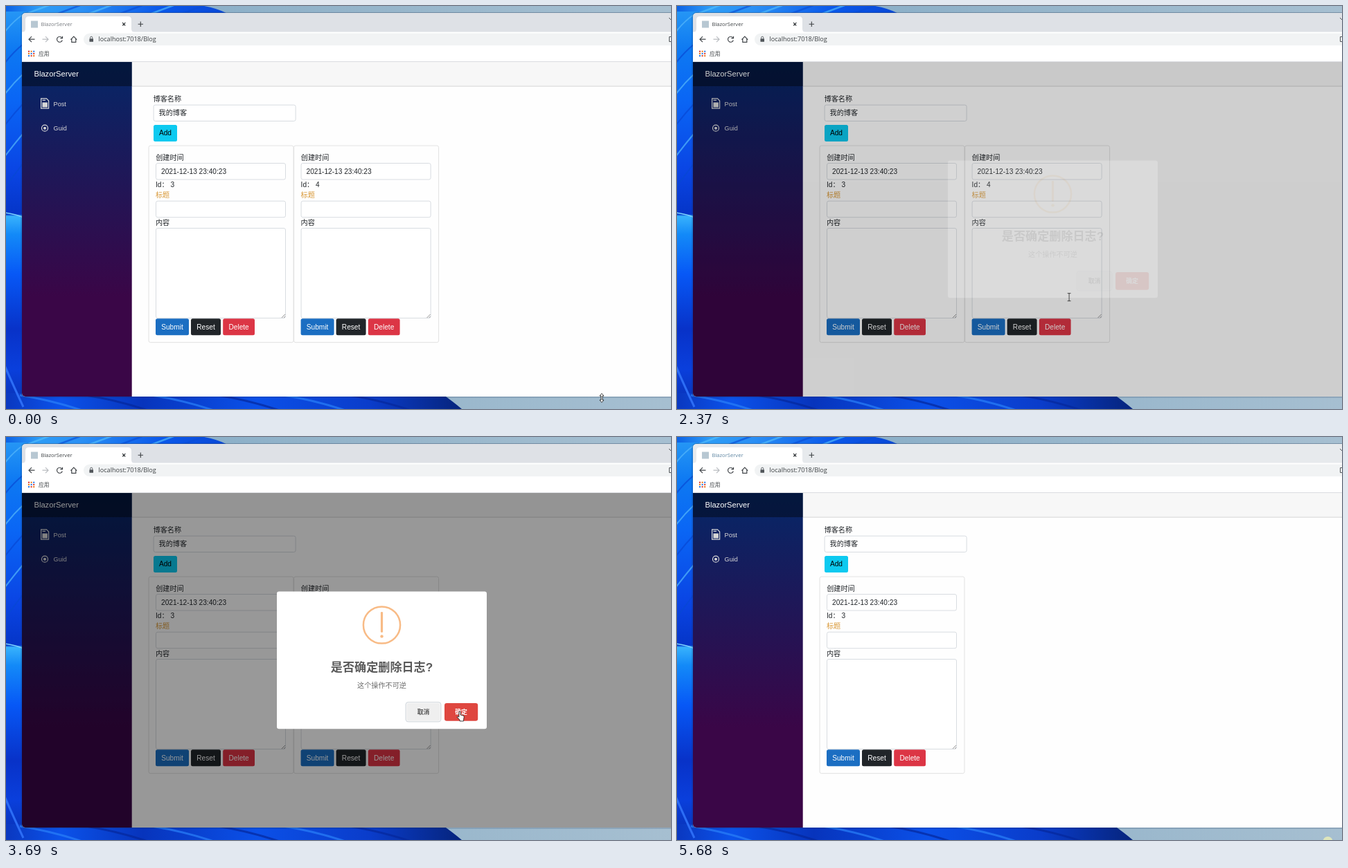
An HTML page for the animation above (5750 ms loop, 960 px wide and 583 px high).

```html
<!DOCTYPE html>
<html lang="zh">
<head>
<meta charset="utf-8">
<title>BlazorServer</title>
<style>
html, body { margin: 0; width: 100%; height: 100%; overflow: hidden; background: #98b5ca; }
svg { display: block; width: 960px; height: 583px; cursor: default; }
text { font-family: "Liberation Sans", "Noto Sans CJK SC", "Noto Sans CJK", sans-serif; white-space: pre; }
.ui { font-family: "Open Sans", "Noto Sans CJK SC", "Noto Sans CJK", sans-serif; }
.mid { text-anchor: middle; }
.bold { font-weight: 700; }
</style>
</head>
<body>
<svg id="stage" viewBox="0 0 960 583" xmlns="http://www.w3.org/2000/svg"></svg>
<script>
const LOOP = 5750, UNIT = 0.634;
const REM = 16 * UNIT;

// Markup helpers
const text = (x, y, s, size = REM, fill = '#212529', extra = '') =>
  `<text x="${x}" y="${y}" font-size="${size}" fill="${fill}" ${extra}>${s}</text>`;
const rect = (x, y, w, h, fill, rx = 0, extra = '') =>
  `<rect x="${x}" y="${y}" width="${w}" height="${h}" rx="${rx}" fill="${fill}" ${extra}/>`;
const line = (d, color, width = 1, extra = '') =>
  `<path d="${d}" fill="none" stroke="${color}" stroke-width="${width}" ${extra}/>`;
const field = (x, y, w, h) => rect(x + .5, y + .5, w - 1, h - 1, '#fff', 2.5, 'stroke="#ced4da" stroke-width=".8"');
const button = (x, y, w, label, fill, color = '#fff', extra = '') =>
  rect(x, y, w, 24, fill, 2.5, extra) + text(x + w / 2, y + 15.4, label, REM, color, 'class="mid"');
const gradient = (id, vertical, stops) =>
  `<linearGradient id="${id}" x2="${vertical ? 0 : 1}" y2="${vertical ? 1 : 0}">` +
  stops.map(([o, c]) => `<stop offset="${o}" stop-color="${c}"/>`).join('') + '</linearGradient>';

const defs = () => '<defs>' +
  gradient('sky', false, [[0, '#7fa9c6'], [.5, '#94b4ca'], [1, '#a6bfd1']]) +
  gradient('petalLeft', true, [[0, '#2596f5'], [.1, '#0d78f2'], [.22, '#0a66f5'], [.4, '#0a45e4'],
    [.51, '#0535c8'], [.515, '#38b2fc'], [.56, '#138af8'], [.66, '#0758f6'], [.8, '#0832c8'], [.9, '#0a3fdc'], [1, '#0830ae']]) +
  gradient('petalTop', false, [[0, '#0c62e6'], [.15, '#2d9cf6'], [.35, '#2a8ff5'], [.7, '#0a58ea'], [1, '#0a48d6']]) +
  gradient('petalBottom', false, [[0, '#0a38c0'], [.12, '#0b52ea'], [.3, '#0734bc'], [.55, '#0b50e8'], [.8, '#0a3cca'], [1, '#06247c']]) +
  gradient('side', true, [[0, '#052767'], [.7, '#3a0647'], [1, '#3a0647']]) +
  `<clipPath id="window">${rect(23, 10, 960, 555, '#000', 5)}</clipPath></defs>`;

const wallpaper = () => {
  const streaks = [0, 1, 2, 3, 4, 5].map(i =>
    line(`M-2 ${38 + i * 45}Q10 ${22 + i * 45} 25 ${12 + i * 43}`, i % 2 ? '#0848d4' : '#55b8fb', 2, 'opacity=".7"') +
    line(`M${30 + i * 45} 11Q${48 + i * 45} 4 ${62 + i * 45} -1`, i % 2 ? '#0a4ed8' : '#55c0fc', 2.5, 'opacity=".65"') +
    line(`M${20 + i * 95} 563Q${65 + i * 95} 570 ${110 + i * 95} 585`, i % 2 ? '#05279c' : '#2a80fa', 3, 'opacity=".7"'));
  return rect(0, 0, 960, 583, 'url(#sky)') +
    '<path d="M0 0H286Q304 3 320 11H0Z" fill="url(#petalTop)"/>' +
    rect(0, 8, 30, 575, 'url(#petalLeft)') +
    '<path d="M0 560H628Q645 572 658 583H0Z" fill="url(#petalBottom)"/>' + streaks.join('') +
    line('M-2 299Q14 301 25 306', '#7ed4ff', 1.5) + line('M-2 520Q10 548 25 580', '#2c6df5', 3) +
    rect(22, 9.5, 960, 556.5, 'none', 6, 'stroke="#1b3350" stroke-opacity=".35"');
};

const browser = () => {
  const dots = [...Array(9).keys()].map(i =>
    rect(32 + i % 3 * 3.6, 64.7 + (i / 3 | 0) * 3.2, 2, 2, ['#d93025', '#e8710a', '#1a73e8'][(i + (i / 3 | 0)) % 3]));
  return '<g id="bar" fill="#dee1e6">' + rect(23, 10, 940, 30, 'inherit') + '</g>' +
    '<path d="M23 38Q28 38 28 33V20Q28 15 33 15H176Q181 15 181 20V33Q181 38 186 38Z" fill="#fff"/>' +
    rect(23, 37.5, 940, 43, '#fff') + rect(36, 21.5, 10, 10, '#b7c7d2') +
    text(50.5, 29.2, 'BlazorServer', 7.6, '#3c4043', 'class="ui" id="tabTitle"') +
    line('M168 24l4.4 4.4M172.4 24l-4.4 4.4M194.3 22.5v7.4M190.6 26.2H198', '#3c4043', 1.1) +
    rect(112, 39.5, 870, 17.5, '#f1f3f4', 8.7) +
    line('M41.5 48.2H33M37 44.2L33 48.2 37 52.2', '#43474b', 1.2) +
    line('M52.5 48.2H61M57 44.2L61 48.2 57 52.2', '#b9bcc0', 1.2) +
    line('M80.6 45.7A4 4 0 1 0 81.3 49.5M81.5 43.8V46.7H78.4', '#43474b', 1.2) +
    line('M93.4 48.6L97.8 44.1 102.2 48.6M94.8 47.5V52.4H100.8V47.5', '#43474b', 1.2) +
    rect(120.4, 47.2, 5.6, 4.6, '#50555a', .6) + line('M121.6 47.5V45.8a1.6 1.6 0 0 1 3.2 0V47.5', '#50555a', .9) +
    text(133.5, 51.3, 'localhost:7018/Blog', 9.1, '#3c4043', 'class="ui"') +
    line('M957 17l3 3M962 44.5H957.5V51.5H962', '#50555a', 1) +
    dots.join('') + text(47, 71.8, '应用', 7.7, '#3c4043', 'class="ui"') +
    rect(23, 80, 940, 1, '#dadce0');
};

const card = (x, id) => rect(x - 10, 202, 209, 284.7, 'none', 2.5, 'stroke="#dfdfdf" stroke-width=".9"') +
  text(x + .2, 222.6, '创建时间') + field(x, 227, 188, 24.5) +
  text(x + 8, 242.8, '2021-12-13 23:40:23') + text(x, 262.3, 'Id： ' + id) +
  text(x, 277.2, '标题', REM, '#d99a3a') + field(x, 281.7, 188, 24.5) +
  text(x, 316.9, '内容') + field(x, 321, 188, 131) +
  line(`M${x + 182} 451l5 -5M${x + 185} 451l2 -2`, '#777', .8) +
  button(x, 452.2, 48, 'Submit', '#1b6ec2') + button(x + 51, 452.2, 43, 'Reset', '#212529') +
  button(x + 97.2, 452.2, 45.8, 'Delete', '#dc3545', '#fff', id === 4 ? 'id="delete" stroke="#e15361" stroke-width="0"' : '');

const page = () => rect(23, 81, 940, 484, '#fefefe') +
  rect(182, 81, 780, 35, '#f7f7f7') + rect(182, 115.6, 780, .9, '#d0d0d0') +
  rect(23, 81, 158.7, 484, 'url(#side)') + rect(23, 81, 158.7, 35, '#000', 0, 'opacity=".4"') +
  text(40.5, 102, 'BlazorServer', 11.16, '#fff') +
  line('M50.6 133.9H58.5L61.6 137V148.2H50.6Z', '#d7d7d7', 1.2) + rect(52.4, 139.5, 7.5, 7, '#d7d7d7') +
  line('M52.5 136.3H57', '#d7d7d7', 1.2) + text(68.6, 144.7, 'Post', 9.13, '#d7d7d7') +
  '<circle cx="56" cy="176.7" r="4.5" fill="none" stroke="#d7d7d7" stroke-width="1.2"/><circle cx="56" cy="176.7" r="2" fill="#d7d7d7"/>' +
  text(68.6, 180.3, 'Guid', 9.13, '#d7d7d7') +
  text(212.6, 138.4, '博客名称') + field(212.6, 142.7, 206, 24.3) + text(220.6, 158.4, '我的博客') +
  button(213, 172, 34, 'Add', '#0dcaf0', '#000') +
  card(216, 3) + `<g id="card4">${card(425.6, 4)}</g>`;

const modalText = (title, body) =>
  text(542.5, 339.4, title, 27 * UNIT, '#595959', 'class="mid bold"') +
  text(542.5, 362.8, body, REM, '#6b6b6b', 'class="mid"');
const modalButton = (id, x, w, label, fill, color, ring) =>
  (ring ? rect(x - 1.9, 383, w + 3.8, 29.6, ring, 4.6) + rect(x - .6, 384.3, w + 1.2, 27, '#fff', 3.6) : '') +
  rect(x, 384.9, w, 25.8, fill, 3.2, `id="${id}"`) +
  text(x + w / 2, 401, label, 14 * UNIT, color, 'class="mid bold"');

const modals = () => rect(23, 81, 940, 484, '#000', 0, 'opacity=".4"') + '<g id="modal">' +
  rect(391, 223.5, 303, 198.7, '#fff', 3.2) +
  '<g id="ask"><g id="warn"><circle cx="542.5" cy="272" r="26.6" fill="none" stroke="currentColor" stroke-width="2.5"/>' +
  rect(540.9, 253, 3.2, 29.8, 'currentColor', 1.3) + '<circle cx="542.5" cy="288.4" r="2.2" fill="currentColor"/></g>' +
  modalText('是否确定删除日志?', '这个操作不可逆') +
  modalButton('cancel', 578.4, 48.2, '取消', '#efefef', '#555', '#d7dce0') +
  modalButton('confirm', 633, 48.2, '确定', '#e64942', '#fff') + '</g>' +
  `<g id="done"><g transform="translate(542.5 272) scale(${UNIT})">` +
  '<circle r="42" fill="none" stroke="#a5dc86" stroke-width="4"/>' +
  '<path d="M-13 -47A60 60 0 0 0 -13 73Z" fill="#fff" transform="rotate(-45 -13 13)"/>' +
  '<path id="cover" d="M-10 -51A60 60 0 0 1 -10 69Z" fill="#fff"/>' +
  rect(-12, -32, 7, 92, '#fff', 0, 'transform="rotate(-45 -8.5 14)"') +
  '<circle r="42" fill="none" stroke="#a5dc86" stroke-opacity=".2" stroke-width="4"/>' +
  rect(0, 0, 0, 5, '#a5dc86', 2, 'id="tip"') + rect(0, 0, 0, 5, '#a5dc86', 2, 'id="long"') + '</g>' +
  modalText('删除成功', '日志被删除了') +
  modalButton('ok', 637.3, 43.8, 'OK', '#7cd1f9', '#fff', '#c2d6e4') + '</g></g>';

const cursors = {
  arrow: '<path d="M0 0V11L2.5 8.8 4.2 12.5 5.9 11.8 4.3 8.2H7.7Z"/>',
  hand: '<path d="M-1.1 1a1.1 1.1 0 0 1 2.2 0V5l3.8.9q1.6.4 1.4 2L5.6 11.5V14H0V12.2L-3.9 8.1q.8-1.6 2.8 0Z"/>',
  ibeam: '<path d="M-2.4 -5.5H2.4M0 -5.5V5.5M-2.4 5.5H2.4" stroke="#222"/>',
  resize: '<path d="M0 -6.5L3 -3H1V3H3L0 6.5 -3 3H-1V-3H-3Z"/>'
};

document.getElementById('stage').innerHTML = defs() + wallpaper() +
  `<g clip-path="url(#window)">${browser()}${page()}<g id="overlay">${modals()}</g></g>` +
  '<circle id="halo" cx="939.5" cy="585" r="7" fill="#dfe6bb"/>' +
  '<g id="cursor" fill="#fff" stroke="#111" stroke-width=".8" stroke-linejoin="round">' +
  Object.entries(cursors).map(([k, s]) => `<g id="${k}">${s}</g>`).join('') + '</g>';

// Motion helpers
const el = id => document.getElementById(id);
const set = (id, attrs) => { for (const k in attrs) el(id).setAttribute(k, attrs[k]); };
const show = (id, on) => set(id, { visibility: on ? 'inherit' : 'hidden' });
const clamp = v => Math.max(0, Math.min(1, v));
const lerp = (a, b, p) => a + (b - a) * p;
const bezier = (x1, y1, x2, y2) => x => {
  const at = (a, b, s) => 3 * a * s * (1 - s) ** 2 + 3 * b * s * s * (1 - s) + s ** 3;
  let lo = 0, hi = 1;
  for (let i = 0; i < 20; i++) at(x1, x2, (lo + hi) / 2) < x ? lo = (lo + hi) / 2 : hi = (lo + hi) / 2;
  return at(y1, y2, (lo + hi) / 2);
};
const ease = bezier(.25, .1, .25, 1), easeIn = bezier(.42, 0, 1, 1), linear = p => p;
const ramp = (t, start, length) => ease(clamp((t - start) / length));
const between = (t, a, b, length) => ramp(t, a, length) - ramp(t, b, length);
const mix = (a, b, p) => `rgb(${a.map((v, i) => Math.round(lerp(v, b[i], p)))})`;

// Keys are [time, ...values]; each segment is eased on its own.
const track = (keys, t, curve = ease) => {
  const i = keys.findIndex(k => k[0] > t);
  if (i === 0) return keys[0].slice(1);
  if (i < 0) return keys[keys.length - 1].slice(1);
  const a = keys[i - 1], b = keys[i], p = curve((t - a[0]) / (b[0] - a[0]));
  return a.slice(1).map((v, j) => lerp(v, b[j + 1], p));
};

const ASK_1 = 1105, CLOSE_1 = 2278, ASK_2 = 3005, DONE = 3928, CLOSE_2 = 4870;
const POP = [[0, .5], [.45, 1.05], [.8, .95], [1, 1]];
const TIP = [[.54, 0, 1, 19], [.7, 50, -8, 37], [.84, 17, 21, 48], [1, 25, 14, 45]];
const LONG = [[.65, 0, 46, 54], [.84, 55, 0, 35], [1, 47, 8, 38]];
const PATH = [[50, 860, 567], [200, 800, 543], [400, 650, 490], [620, 549, 469], [680, 550, 467],
  [1270, 550, 467], [1480, 577, 441], [1680, 587, 398.5], [1780, 590, 398], [2230, 590, 398],
  [2510, 542.5, 444], [2700, 546, 463], [2790, 547, 466], [2960, 547, 466], [3140, 599.5, 440],
  [3350, 645, 410], [3490, 655, 397], [3960, 655, 397], [4180, 645, 430], [4250, 643.5, 421],
  [4480, 653, 400], [4730, 656, 397], [4900, 656, 397], [5150, 800, 490], [5440, 942, 586]];

function render(t) {
  const [x, y] = track(PATH, t, linear);
  const inside = (l, top, r, b) => x >= l && x <= r && y >= top && y <= b;
  const asking = t >= ASK_1 && t < CLOSE_1 || t >= ASK_2 && t < DONE;
  const finished = t >= DONE && t < CLOSE_2;
  const opened = t >= DONE ? DONE : t >= ASK_2 ? ASK_2 : ASK_1;
  const age = t - opened;

  const overCancel = asking && inside(578, 385, 627, 411);
  const overConfirm = asking && inside(633, 385, 681, 411);
  const overOk = finished && inside(637, 385, 681, 411);
  const overArea = !asking && !finished && inside(425, 321, 614, 452) && t < DONE;
  const kind = overCancel || overConfirm || overOk ? 'hand' : overArea ? 'ibeam' : y > 563 && y < 571 ? 'resize' : 'arrow';
  Object.keys(cursors).forEach(k => show(k, k === kind));
  set('cursor', { transform: `translate(${x} ${y})` });

  const focused = t >= 940 && t < 5680;
  set('tabTitle', { fill: focused ? '#3c4043' : t < 940 ? '#74787d' : '#5b83a0' });
  set('bar', { fill: t < 5680 ? '#dee1e6' : '#e7eaed' });
  show('halo', t >= 5680);
  show('card4', t < DONE);

  const hover = between(t, 575, ASK_1, 150) + between(t, 2650, ASK_2, 150);
  const press = between(t, 930, ASK_1, 120) + between(t, 2910, ASK_2, 120);
  set('delete', { fill: mix([220, 53, 69], [178, 43, 56], hover), 'stroke-width': 2.4 * press, 'stroke-opacity': .5 });

  const fade = between(t, ASK_1, CLOSE_1, 300) + between(t, ASK_2, CLOSE_2, 300);
  const solid = between(t, ASK_1, CLOSE_1, 200) + between(t, ASK_2, CLOSE_2, 200);
  const [scale] = track(POP, age / 300);
  set('overlay', { opacity: fade });
  set('modal', { opacity: solid, transform: `translate(542.5 323) scale(${scale}) translate(-542.5 -323)` });
  show('ask', t < DONE);
  show('done', t >= DONE);

  const phase = Math.max(0, age) / 750 % 2;
  el('warn').style.color = mix([248, 212, 134], [248, 187, 134], ease(phase > 1 ? 2 - phase : phase));
  set('cancel', { fill: overCancel ? '#e8e8e8' : '#efefef' });
  set('confirm', { fill: overConfirm ? '#df4740' : '#e64942' });
  set('ok', { fill: overOk ? '#78cbf2' : '#7cd1f9' });

  const since = t - DONE;
  const [turn] = track([[212, -45], [510, -405]], since, easeIn);
  set('cover', { transform: `rotate(${turn} -10 9)` });
  const stroke = (id, left, top, w, angle) => set(id, {
    x: left - 40, y: top - 40, width: w, transform: `rotate(${angle} ${left - 40 + w / 2} ${top - 37.5})`
  });
  const [tw, tl, tt] = track(TIP, since / 750);
  const [lw, lr, lt] = track(LONG, since / 750);
  stroke('tip', tl, tt, tw, 45);
  stroke('long', 80 - lr - lw, lt, lw, -45);
}

const begin = performance.now();
function tick() {
  render((performance.now() - begin) % LOOP);
  requestAnimationFrame(tick);
}
tick();
</script>
</body>
</html>
```
